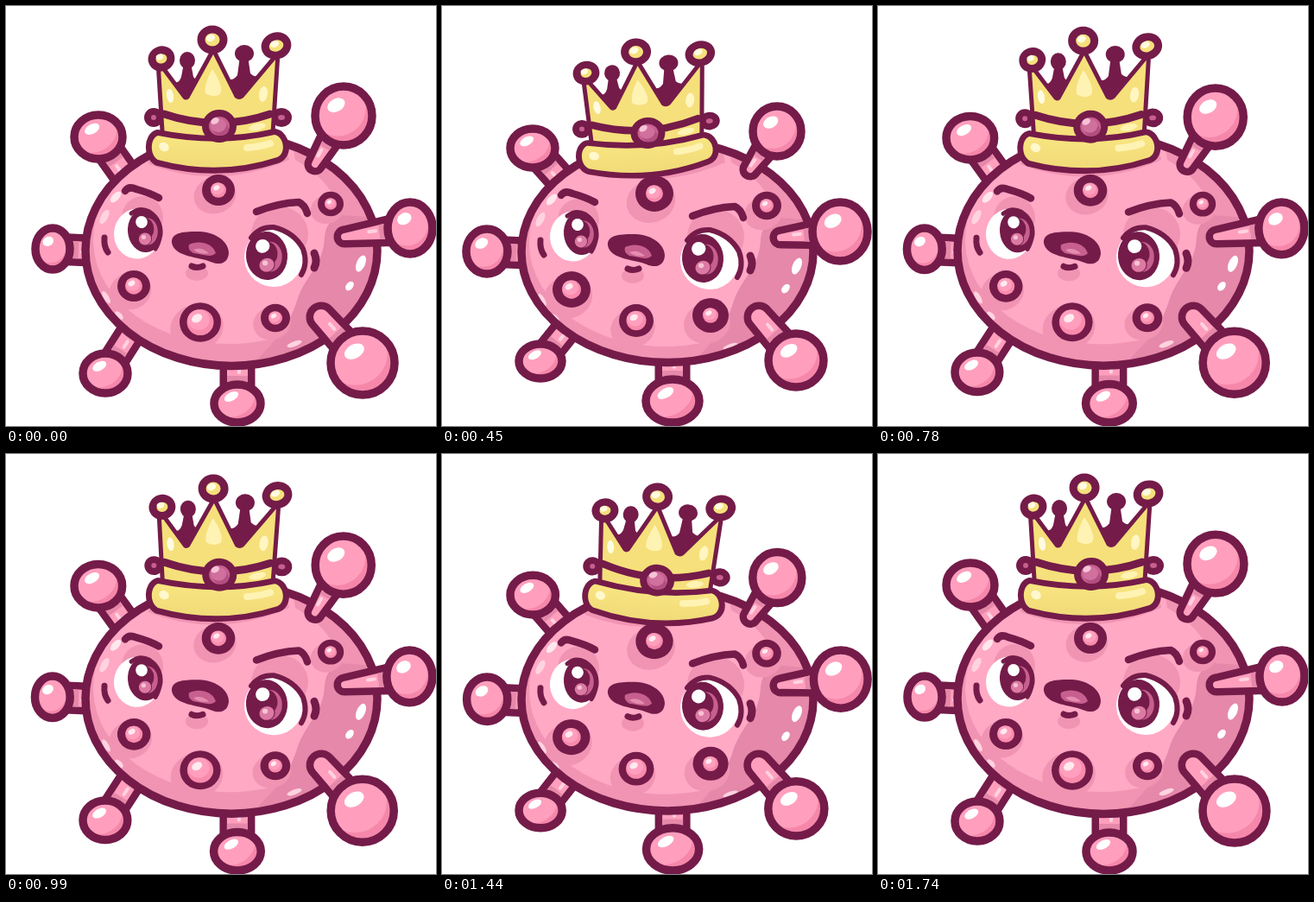
Recreate the animation shown at these times as an HTML page with a canvas. Size 498x486 px, loop 1.77 s.

```html
<!DOCTYPE html>
<html lang="en">
<head>
<meta charset="utf-8">
<title>Crowned germ</title>
<style>
html, body { margin: 0; width: 100%; height: 100%; overflow: hidden; background: #fff; }
canvas { display: block; width: 498px; height: 486px; }
</style>
</head>
<body>
<canvas id="stage" width="498" height="486"></canvas>
<script>
const ctx = document.getElementById('stage').getContext('2d');
const LOOP = 1770, BEAT = LOOP / 2, STEP = 30;
const INK = '#741b49', SKIN = '#ffa9c5', SHADE = '#e588a9', MID = '#f194b3',
      BULB = '#ff9fbd', BULB_DARK = '#f587aa', GLOW = '#ffd3e0',
      GOLD = '#f6e07b', GOLD_LIGHT = '#fff3b4', GEM = '#c75f8f';

// Each bulb: resting and squeezed [x, y, rx, ry], the stem foot in both poses,
// and the stem radius at the foot and at the bulb
const backBulbs = [
  { a: [107, 151.5, 28, 25.5], b: [105, 164.5, 26, 22.5], foot: [142, 201, 142, 206], r: [10, 10] },
  { a: [268, 460, 27, 22], b: [267, 457, 31, 25], foot: [268, 410, 267, 406], r: [12, 12] },
  { a: [115, 425, 26, 23], b: [114, 411, 25, 20], foot: [143, 381, 143, 375], r: [9, 9] },
  { a: [54, 281, 20, 24], b: [52, 284, 24, 26], foot: [98, 283, 98, 286], r: [10, 10] }
];
const frontBulbs = [
  { a: [391, 127, 33, 34], b: [388, 145, 28, 29], foot: [358, 183, 357, 189], r: [4, 10] },
  { a: [468, 257, 26, 30], b: [461, 261, 32, 34], foot: [392, 267, 392, 268], r: [4, 12] },
  { a: [413, 413, 37, 37], b: [410, 410, 32, 31], foot: [365, 360, 367, 360], r: [9, 11] }
];
// Spots: resting and squeezed [x, y, outer radius, inner radius]
const spots = [
  [[246, 213, 19, 9], [246, 217, 22, 10]],
  [[376, 229, 15, 7], [376, 231, 17, 8]],
  [[148, 324, 19, 10], [150, 328, 22, 11]],
  [[225, 366, 24, 15.5], [225, 364, 20, 11.5]],
  [[312, 361, 17, 8], [311, 358, 21, 9]]
];

const mix = (a, b, k) => a + (b - a) * k;
const mixAll = (a, b, k) => a.map((v, i) => mix(v, b[i], k));

function oval(x, y, rx, ry, fill, turn = 0, line = 0) {
  ctx.beginPath();
  ctx.ellipse(x, y, rx, ry, turn, 0, Math.PI * 2);
  if (fill) { ctx.fillStyle = fill; ctx.fill(); }
  if (line) { ctx.strokeStyle = INK; ctx.lineWidth = line; ctx.stroke(); }
}

function shape(d, fill, line = 0, color = INK) {
  const p = new Path2D(d);
  if (line) { ctx.strokeStyle = color; ctx.lineWidth = line; ctx.stroke(p); }
  if (fill) { ctx.fillStyle = fill; ctx.fill(p); }
}

function within(makePath, draw) {
  ctx.save();
  ctx.beginPath();
  makePath();
  ctx.clip();
  draw();
  ctx.restore();
}

// Drawn along the x axis, from the rounded foot to the middle of the bulb
function stem(fx, fy, x, y, [r0, r1], reach) {
  const len = Math.hypot(x - fx, y - fy);
  const path = () => {
    ctx.arc(0, 0, r0, Math.PI / 2, Math.PI * 1.5);
    ctx.lineTo(len, -r1);
    ctx.lineTo(len, r1);
    ctx.closePath();
  };
  ctx.save();
  ctx.translate(fx, fy);
  ctx.rotate(Math.atan2(y - fy, x - fx));
  ctx.beginPath();
  path();
  ctx.strokeStyle = INK;
  ctx.lineWidth = 17;
  ctx.stroke();
  ctx.fillStyle = BULB;
  ctx.fill();
  within(path, () => {
    ctx.fillStyle = SHADE;
    ctx.fillRect(len - reach, -20, reach, 40);
    shape(`M${len - reach - 4} -2h-8`, null, 4, GLOW);
  });
  ctx.restore();
}

function bulb(item, k) {
  const [x, y, rx, ry] = mixAll(item.a, item.b, k);
  const fx = mix(item.foot[0], item.foot[2], k), fy = mix(item.foot[1], item.foot[3], k);
  stem(fx, fy, x, y, item.r, Math.min(rx, ry) + 10);
  oval(x, y, rx, ry, BULB_DARK);
  within(() => ctx.ellipse(x, y, rx, ry, 0, 0, Math.PI * 2), () =>
    oval(x - rx * .2, y - ry * .24, rx * .98, ry * .93, BULB, -.4));
  oval(x, y, rx, ry, null, 0, 9.5);
  oval(x - rx * .26, y - ry * .36, rx * .33, ry * .22, '#fff', -.5);
}

function body(k) {
  const cy = mix(283, 284.5, k), ry = mix(133.5, 128, k);
  const outline = () => ctx.ellipse(261, cy, 169, ry, 0, 0, Math.PI * 2);
  oval(261, cy, 169, ry, MID);
  within(outline, () => {
    ctx.translate(0, 3 * k);
    oval(262, 268, 161, 123, SKIN, -.04);
    shape('M440 226C402 232 372 238 369 267C368 300 346 312 337 341C328 370 312 388 280 420L420 425L450 300Z', SHADE);
    shape('M353 150Q400 185 430 245L390 242Q374 198 335 178L330 150Z', MID);
    shape('M165 183Q245 214 328 178L324 160L165 160Z', MID);
    for (const [a, b] of spots) {
      const [x, y, r] = mixAll(a, b, k);
      oval(x - 4, y + 6, r * 1.3, r * 1.12, MID, -.3);
    }
    oval(114, 244, 4, 9, GLOW, .5);
    oval(127, 221, 4, 8, '#ffe7ee', .75);
    oval(116, 337, 3, 8, GLOW, -.55);
    oval(131, 358, 3, 6, GLOW, -.8);
    oval(334, 391, 9, 3, GLOW, -.35);
    oval(411, 298, 5, 10, '#fff', .4);
    oval(398, 324, 4, 6, '#fff', .65);
  });
  oval(261, cy, 169, ry, null, 0, 9.5);
}

function spot([a, b], k) {
  const [x, y, r, inner] = mixAll(a, b, k);
  oval(x, y, r, r * .95, INK);
  oval(x, y, inner, inner * .97, '#f98bad');
  oval(x - inner * .12, y - inner * .18, inner * .82, inner * .76, BULB);
  oval(x - inner * .25, y - inner * .3, inner * .42, inner * .3, '#ffeaf0', -.5);
}

function iris(x, y, rx, ry) {
  oval(x, y, rx, ry, INK, -.08);
  oval(x + rx * .16, y + ry * .04, rx * .58, ry * .62, GEM);
  oval(x + rx * .02, y - ry * .08, rx * .5, ry * .5, INK);
  oval(x - rx * .02, y + ry * .36, rx * .42, ry * .34, INK);
  oval(x, y + ry * .38, rx * .36, ry * .28, '#dc7aa3', -.3);
  oval(x - rx * .2, y - ry * .4, rx * .34, ry * .28, '#fff', -.4);
  oval(x - rx * .08, y + ry * .3, rx * .13, ry * .1, '#f6c3d5');
}

// lid: 0 is open, 1 is shut
function eyes(lid) {
  oval(158, 245, 24, 25, MID);
  oval(317, 264, 33, 32, MID);
  if (lid < 1) {
    oval(152, 263.5, 27, 29, '#fff', .1);
    iris(161, 260, 20, 25);
    shape('M145 240Q155 232 166 238Q180 248 179 264Q177 275 173 281', null, 5);
    oval(310, 291, 34, 34, '#fff', -.1);
    iris(302, 289, 24, 28);
    shape('M284 268Q294 255 310 256Q334 262 344 281Q350 298 342 311', null, 6);
  }
  if (lid > 0) {
    const leftEdge = mix(226, 285, lid), rightEdge = mix(248, 312, lid);
    within(() => ctx.rect(120, 200, 70, leftEdge - 200), () =>
      oval(154, 250, 27, 31, SHADE, .1));
    within(() => ctx.rect(265, 220, 90, rightEdge - 220), () =>
      oval(311, 272, 33, 36, SHADE, -.1));
  }
  if (lid === 1) {
    shape('M129 262Q136 280 152 280Q171 277 178 253', null, 7);
    shape('M278 281Q285 305 311 305Q337 303 342 280', null, 7);
  }
}

function face(k, lid) {
  ctx.save();
  ctx.translate(0, 3 * k);
  eyes(lid);
  shape('M114 268Q113 278 118 285', null, 7);
  shape('M357 286Q361 295 357 303', null, 9);
  oval(221, 309, 13, 9, MID);
  shape('M192 274C191 261 208 261 224 261C244 262 258 273 258 286C257 299 246 300 237 296C224 290 195 291 192 274Z', INK);
  shape('M212 276C222 271 239 273 243 286C237 292 228 287 217 286Q210 282 212 276Z', GEM);
  shape('M217 282Q226 278 235 286Q225 288 217 282Z', '#e58db0');
  shape('M215 301Q221 304 228 301', null, 7);
  ctx.translate(0, 2 * k);
  shape('M138 214Q142 208 151 212Q166 216 177 222', null, 8.5);
  shape('M290 238Q315 228 339 227Q346 230 349 240', null, 8.5);
  ctx.restore();
}

function tip(x, y, rx, ry, turn) {
  oval(x, y, rx, ry, GOLD, turn, 9);
  oval(x - 2, y - 2, rx * .4, ry * .34, '#fffbe0', -.4);
}

function crown(k, second) {
  ctx.save();
  ctx.translate(247 + (second ? 2.4 : -8.5) * k, 139 + 8 * k);
  ctx.rotate((second ? 5.6 : -3.6) * k * Math.PI / 180);
  ctx.scale(1, 1 - (second ? .04 : .055) * k);
  ctx.translate(-247, -139);

  // far side of the crown
  oval(210, 63, 9, 10, INK);
  oval(276, 55, 11, 10, INK);
  shape('M206 66L214 66L217 82Q222 90 230 78L232 112L192 112L186 80Q198 96 203 82Z', INK);
  shape('M271 58L280 58L283 78Q291 86 303 76L298 112L252 112L248 76Q260 92 268 80Z', INK);
  oval(171, 129, 7, 7, GEM, 0, 8);
  oval(319, 129, 8, 7, GEM, 0, 8);

  shape('M179 72L205 107Q208 110 212 107L240 56L265 106Q270 110 275 106L312 62L306 154Q245 170 184 153Z', GOLD, 10);
  shape('M239 73C246 84 252 96 248 102Q239 107 231 101Q229 91 239 73Z', GOLD_LIGHT);
  oval(190, 104, 4, 8, '#fffbe0', -.15);
  oval(298, 102, 5, 9, '#fff6c2', .15);
  shape('M183 125Q245 146 306 125', null, 9);
  oval(291, 140, 10, 4, GOLD_LIGHT, -.2);

  const cushion = ctx.createLinearGradient(0, 150, 0, 188);
  cushion.addColorStop(0, '#f8e580');
  cushion.addColorStop(1, '#f1da78');
  shape('M176 150Q246 164 311 149C322 151 325 171 314 175Q247 197 176 178C166 172 167 153 176 150Z', cushion, 14);
  oval(183, 163, 6, 5, '#fff8cc', .5);
  shape('M279 164Q294 163 306 159', null, 8, GOLD_LIGHT);

  oval(247, 139, 16, 15, GEM, 0, 8);
  oval(249, 143, 9, 7, '#b24f80');
  oval(246, 138, 9, 8, '#d0709d');
  oval(242, 133, 5, 3.5, '#f6c3d7', -.5);

  tip(180, 61, 11, 10, -.3);
  tip(239, 39, 13, 12, 0);
  tip(313, 46, 13, 11, -.3);
  ctx.restore();
}

function lidAt(t) {
  const ramp = (from, to) => Math.min(1, Math.max(0, (t - from) / (to - from)));
  return ramp(150, 210) * (1 - ramp(330, 390));
}

function draw(t) {
  const s = -Math.cos(t / BEAT * Math.PI * 2);
  const k = .5 + .5 * s * (1.25 - .25 * s * s);
  ctx.fillStyle = '#fff';
  ctx.fillRect(0, 0, 498, 486);
  ctx.lineCap = ctx.lineJoin = 'round';
  backBulbs.forEach(item => bulb(item, k));
  body(k);
  spots.forEach(item => spot(item, k));
  face(k, lidAt(t));
  frontBulbs.forEach(item => bulb(item, k));
  crown(k, t >= BEAT);
}

const start = performance.now();
function tick() {
  const t = (performance.now() - start) % LOOP;
  draw(Math.floor(t / STEP) * STEP);
  requestAnimationFrame(tick);
}
tick();
</script>
</body>
</html>
```
